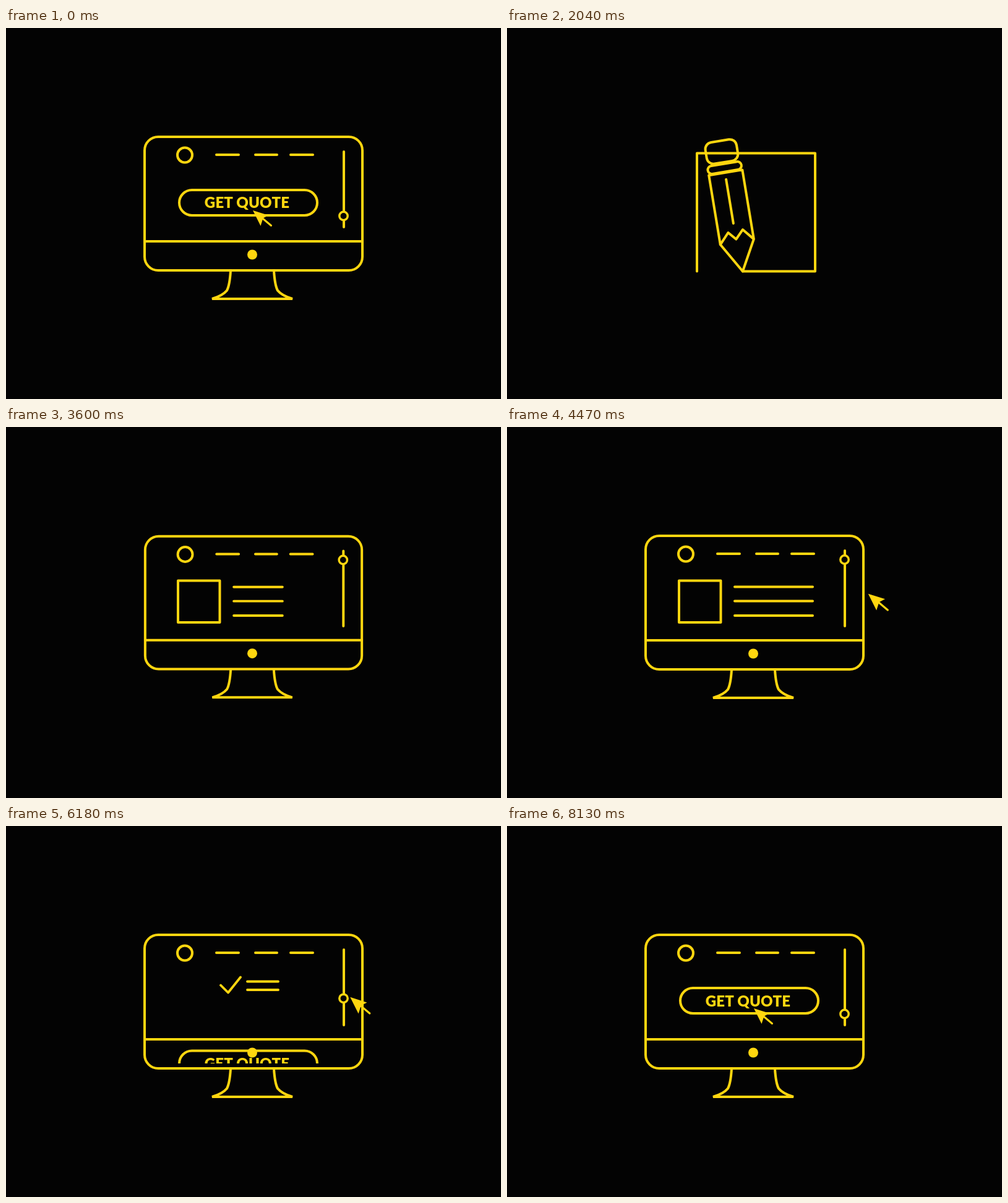
Recreate the animation shown at these times as an HTML page. Size 800 by 600 pixels, loop 8160 ms.

```html
<!DOCTYPE html>
<html lang="en">
<head>
<meta charset="utf-8">
<title>Get quote</title>
<style>
  html, body { margin: 0; width: 100%; height: 100%; overflow: hidden; background: #030303; }
  svg { display: block; width: 800px; height: 600px; }
  .ink { fill: none; stroke: #ffd60f; stroke-width: 4; stroke-linecap: round; stroke-linejoin: round; }
  .solid { fill: #ffd60f; stroke: none; }
  text { font: 900 24px Lato, "Open Sans", sans-serif; letter-spacing: .2px; text-anchor: middle; }
</style>
</head>
<body>
<svg viewBox="0 0 800 600">
  <defs>
    <clipPath id="view"><rect x="230" y="230" width="300" height="154"/></clipPath>
    <g id="item">
      <path d="M280 258L292 270L312 245M323 252H373M323 265.5H373"/>
    </g>
  </defs>
  <g class="ink">
    <g id="monitor">
      <rect x="224" y="176" width="352" height="216" rx="22"/>
      <path d="M224 345H576"/>
      <circle class="solid" cx="398" cy="366.5" r="8"/>
      <path stroke-linejoin="miter" style="stroke-linejoin:miter;stroke-linecap:butt"
        d="M363 393Q361.500 416 357 424.500Q350 433 333 438H463Q446 433 439 424.500Q434.500 416 433 393"/>
      <circle cx="289" cy="205.500" r="12"/>
      <path d="M340 205H376M403 205H438M460 205H496M546 200V322"/>
      <circle id="knob" cx="545.500" r="6.700" style="fill:#030303;stroke-width:3.500"/>
      <g clip-path="url(#view)">
        <g id="pages">
          <g id="intro">
            <rect id="thumb" x="278" y="248.500" width="67.500" height="67.500"/>
            <path id="copy"/>
          </g>
          <g transform="translate(0 150)" style="stroke-width:3.800">
            <use href="#item"/>
            <use href="#item" x="124"/>
            <use href="#item" x="67" y="48"/>
          </g>
          <g transform="translate(0 300)">
            <g id="button">
              <rect x="280" y="262" width="223" height="41" rx="20.500"/>
              <text class="solid" x="389.500" y="291.500">GET QUOTE</text>
            </g>
          </g>
        </g>
      </g>
      <g id="cursor">
        <path class="solid" d="M0 0L25.500 8L16.500 12.500L12.500 25Z"/>
        <path style="stroke-width:3" d="M14 11.500L29.500 24.500"/>
      </g>
    </g>
    <path id="square" pathLength="100"/>
    <g id="pencil">
      <path d="M-28.600 -162V-48.500L-13 -65.500L-2 -53L11 -66.500L26.200 -48.500V-162ZM-28.600 -48.500L0 0L26.200 -48.500M-2.200 -151V-79"/>
      <rect x="-29" y="-176.500" width="55" height="13" rx="6.500"/>
      <rect x="-27.500" y="-214" width="51" height="35" rx="11"/>
    </g>
  </g>
</svg>
<script>
const LOOP = 8160;
const $ = id => document.getElementById(id);
const linear = x => x;
const soft = x => (1 - Math.cos(Math.PI * x)) / 2;
const out = x => Math.sin(Math.PI * x / 2);
const quick = x => x * x;

// keys: time, value, time, value, ...
function track(t, ease, ...keys) {
  if (t <= keys[0]) return keys[1];
  for (let i = 2; i < keys.length; i += 2) {
    const [t0, v0, t1, v1] = keys.slice(i - 2, i + 2);
    if (t < t1) return v0 + (v1 - v0) * ease((t - t0) / (t1 - t0));
  }
  return keys[keys.length - 1];
}
const bezier = (p, a, b, c) => (1 - p) ** 2 * a + 2 * p * (1 - p) * b + p * p * c;
const place = (el, transform) => el.setAttribute("transform", transform);
const show = (el, on) => el.setAttribute("visibility", on ? "inherit" : "hidden");
const scaleAt = (x, y, s) => `translate(${x} ${y}) scale(${s}) translate(${-x} ${-y})`;

function drawPencil(t, done) {
  const size = track(t, out, 480, 0, 580, 1) * track(t, quick, 2520, 1, 2610, 0);
  show($("pencil"), size > 0);
  const side = Math.min(3, Math.floor(done * 4));
  const d = (done * 4 - side) * 191;
  const x = [307, 307 + d, 498, 498 - d][side];
  const y = [393.5 - d, 202.5, 202.5 + d, 393.5][side];
  const lift = track(t, soft, 560, -97, 760, 0);
  const tilt = track(t, soft, 760, -27.5, 960, -30, 1170, -27.5, 1540, 39, 1840, 40, 2210, -47);
  place($("pencil"), `translate(${x} ${y + lift}) rotate(${tilt}) scale(${size})`);
}

function drawSquare(t, done) {
  const square = $("square");
  show(square, done > 0 && t < 3800);
  const move = track(t, soft, 3060, 0, 3420, 1);
  const h = 95.5 + (33.75 - 95.5) * move;
  const turn = track(t, soft, 2620, 0, 3500, 180);
  square.setAttribute("d", `M${-h} ${h}V${-h}H${h}V${h}Z`);
  square.setAttribute("stroke-dasharray", done < 1 ? `${done * 100} 200` : "none");
  place(square, `translate(${402.5 - 90.75 * move} ${298 - 15.75 * move}) rotate(${turn})`);
}

function drawCursor(t, knobY) {
  let x, y;
  if (t < 4720) {
    const p = track(t, out, 4230, 0, 4720, 1);
    x = bezier(p, 808, 580, 545);
    y = bezier(p, 350, 318, 213);
  } else {
    const p = track(t, soft, 6660, 0, 7090, 1);
    const sway = 12 * Math.sin(Math.PI * track(t, linear, 5950, 0, 6550, 1));
    x = bezier(p, 545 + sway, 470, 399);
    y = bezier(p, knobY - 2, 375, 295);
  }
  const size = track(t, soft, 6660, 1.07, 7090, 1, 7170, .91, 7290, 1,
    7650, 1, 7740, .91, 7870, 1);
  const press = t > 7090 ? 1 - size : 0;
  show($("cursor"), t > 4200);
  place($("cursor"), `translate(${x + 15.5 * press} ${y + 13 * press}) scale(${size})`);
}

function drawMonitor(t, late) {
  const size = t < 1000 ? track(t, quick, 0, 1, 330, 0)
    : t < 3420 ? track(t, out, 3100, 0, 3420, 1.03)
    : track(t, soft, 3420, 1.03, 3600, .995, 3740, 1);
  show($("monitor"), size > 0);
  place($("monitor"), scaleAt(400, 307, size));

  show($("intro"), late > 3450);
  show($("thumb"), late >= 3800);
  const end = track(late, out, 3450, 368, 3800, 494);
  $("copy").setAttribute("d", [258.5, 281.5, 305].map(y => `M368 ${y}H${end}`).join(""));

  const knobY = track(late, soft, 4900, 214.5, 5620, 266.8, 5950, 266.8, 6550, 304);
  $("knob").setAttribute("cy", knobY);
  const scroll = track(late, soft, 4900, 0, 5620, 150, 5950, 150, 6550, 300);
  place($("pages"), `translate(0 ${-scroll})`);
  const pulse = track(late, soft, 7180, 1, 7290, 1.05, 7450, 1, 7750, 1, 7860, 1.05, 8020, 1);
  place($("button"), scaleAt(391.5, 282.5, pulse));
  drawCursor(late, knobY);
}

function frame() {
  const t = performance.now() % LOOP;
  // the closing pose carries over into the next round
  const late = t < 1000 ? t + LOOP : t;
  const done = track(t, linear, 780, 0, 840, .035, 1170, .25, 2130, .97, 2210, 1);
  drawMonitor(t, late);
  drawSquare(t, done);
  drawPencil(t, done);
  requestAnimationFrame(frame);
}
frame();
</script>
</body>
</html>
```
